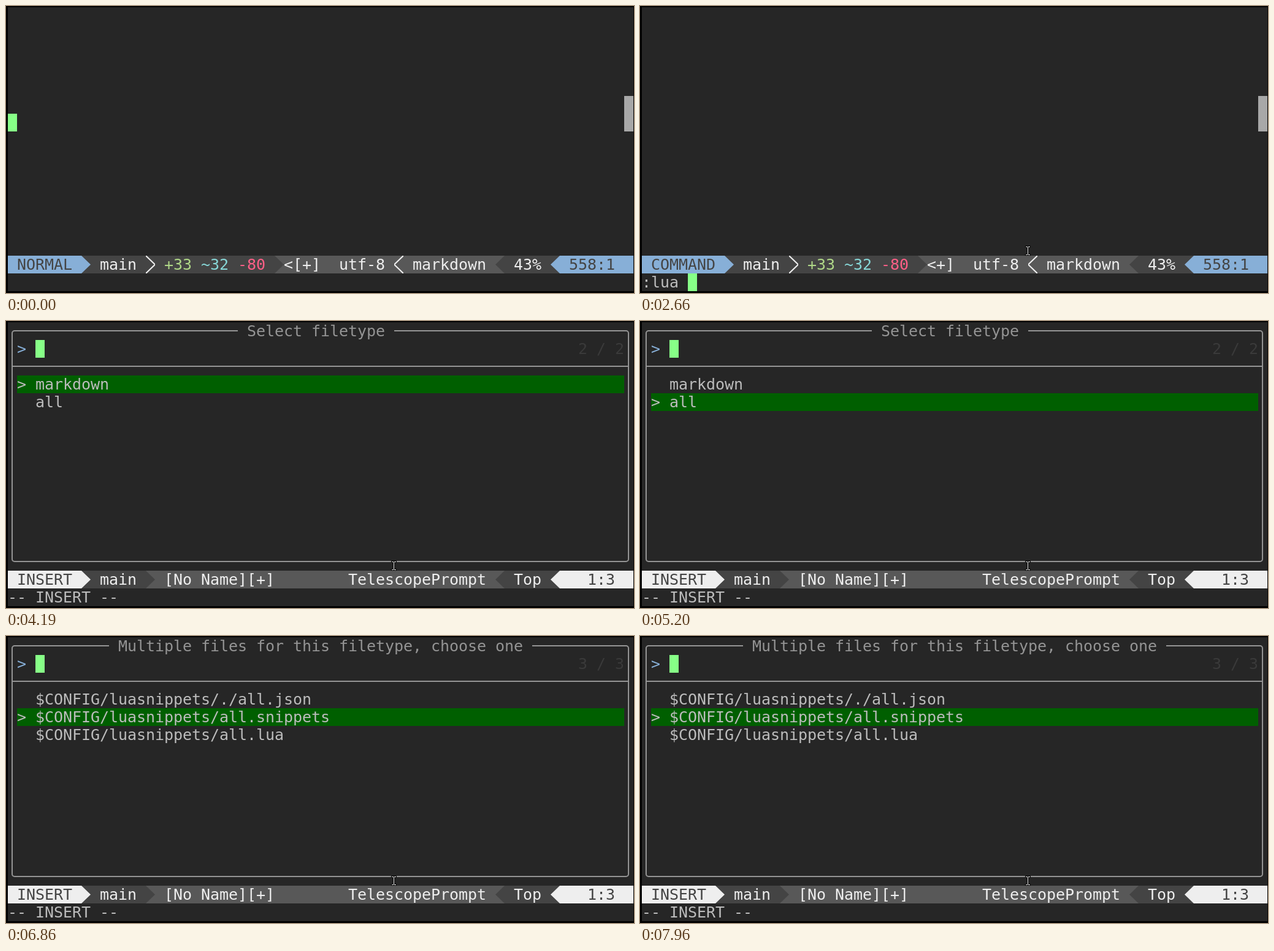
An HTML page with a canvas that plays this animation: 1024x469 px, repeating every 8000 ms.

```html
<!DOCTYPE html>
<html lang="en">
<head>
<meta charset="utf-8">
<title>Editing snippet files</title>
<style>
html, body { margin: 0; width: 100%; height: 100%; overflow: hidden; background: #000; }
canvas { display: block; }
</style>
</head>
<body>
<canvas id="screen" width="1024" height="469"></canvas>
<script>
const ctx = document.getElementById('screen').getContext('2d');
const LOOP = 8000, LEFT = 3, TOP = 2, CW = 15, CH = 29, COLS = 68;
const C = {
  bg: '#262626', fg: '#bcbcbc', white: '#eeeeee', blue: '#87afd7',
  dark: '#444444', mid: '#585858', cursor: '#87ff87', bar: '#a8a8a8',
  border: '#949494', faint: '#3a3a3a', select: '#005f00',
  add: '#afd787', change: '#87d7d7', remove: '#ff5f87'
};
const COMMAND = ':lua require("luasnip.loaders").edit_snippet_files()';
const TYPES = { title: 'Select filetype', items: ['markdown', 'all'] };
const FILES = {
  title: 'Multiple files for this filetype, choose one',
  items: ['./all.json', 'all.snippets', 'all.lua'].map(f => '$CONFIG/luasnippets/' + f)
};

const x = col => LEFT + col * CW;
const y = row => TOP + row * CH;

// Value of the last [time, value] step reached at t.
function at(steps, t) {
  let value = steps[0][1];
  for (const [start, v] of steps) if (t >= start) value = v;
  return value;
}

function cells(col, row, w, h, color) {
  ctx.fillStyle = color;
  ctx.fillRect(x(col), y(row), w * CW, h * CH);
}

function text(str, col, row, color) {
  ctx.fillStyle = color;
  [...str].forEach((ch, i) => {
    if (ch !== ' ') ctx.fillText(ch, x(col + i), y(row) + 23);
  });
}

// Powerline chevron in the status row; dir is 1 for right, -1 for left.
function chevron(col, dir) {
  const base = x(dir > 0 ? col : col + 1), top = y(14);
  ctx.beginPath();
  ctx.moveTo(base, top);
  ctx.lineTo(base + dir * CW, top + CH / 2);
  ctx.lineTo(base, top + CH);
}

function wedge(col, dir, color) {
  chevron(col, dir);
  ctx.fillStyle = color;
  ctx.fill();
}

function thin(col, dir) {
  ctx.save();
  ctx.beginPath();
  ctx.rect(x(col), y(14), CW, CH);
  ctx.clip();
  chevron(col, dir);
  ctx.strokeStyle = C.white;
  ctx.lineWidth = 2;
  ctx.stroke();
  ctx.restore();
}

function status(mode, accent, midCol, type, percent, place) {
  const end = mode.length + 2;
  cells(0, 14, COLS, 1, C.mid);
  cells(0, 14, midCol, 1, C.dark);
  wedge(midCol, 1, C.dark);
  cells(0, 14, end, 1, accent);
  wedge(end, 1, accent);
  text(mode, 1, 14, C.dark);
  text('main', end + 2, 14, C.white);
  text(type, 52 - type.length, 14, C.white);
  wedge(53, -1, C.dark);
  cells(54, 14, 6, 1, C.dark);
  text(percent, 55, 14, C.white);
  wedge(59, -1, accent);
  cells(60, 14, 8, 1, accent);
  text(place, 66 - place.length, 14, C.dark);
}

function editor(t) {
  const typing = t >= 1540;
  const mode = typing ? 'COMMAND' : 'NORMAL';
  const n = mode.length;
  cells(67, 5, 1, 2, C.bar);
  status(mode, C.blue, n + 23, 'markdown', '43%', '558:1');
  thin(n + 9, 1);
  text('+33', n + 11, 14, C.add);
  text('~32', n + 15, 14, C.change);
  text('-80', n + 19, 14, C.remove);
  text(typing ? '<+]' : '<[+]', n + 24, 14, C.white);
  text('utf-8', 36, 14, C.white);
  thin(42, -1);

  if (!typing) return cells(0, 6, 1, 1, C.cursor);
  const len = at([[1540, 1], [1820, 2], [2170, 3], [2220, 4], [2660, 5], [3360, COMMAND.length]], t);
  text(COMMAND.slice(0, len), 0, 15, C.fg);
  if (t >= 3190 && t < 3360) text('"', len, 15, C.blue);
  else cells(len, 15, 1, 1, C.cursor);
}

function frame(title) {
  const l = x(0) + 7, r = x(67) + 7, top = y(0) + 14, bottom = y(13) + 14;
  const start = Math.floor((COLS - title.length) / 2);
  ctx.strokeStyle = C.border;
  ctx.lineWidth = 2;
  ctx.beginPath();
  ctx.roundRect(l, top, r - l, bottom - top, 4);
  ctx.moveTo(l, y(2) + 14);
  ctx.lineTo(r, y(2) + 14);
  ctx.stroke();
  cells(start - 1, 0, title.length + 2, 1, C.bg);
  text(title, start, 0, C.border);
}

function picker(t) {
  const { title, items } = t < 5660 ? TYPES : FILES;
  const chosen = at([[4100, 0], [5200, 1], [5660, 0], [6860, 1], [7240, 2], [7810, 0], [7960, 1]], t);
  frame(title);
  text('>', 1, 1, C.blue);
  cells(3, 1, 1, 1, C.cursor);
  if (t >= 4190) {
    text(`${items.length} / ${items.length}`, 62, 1, C.faint);
    cells(1, 3 + chosen, 66, 1, C.select);
    text('>', 1, 3 + chosen, C.fg);
    items.forEach((item, i) => text(item, 3, 3 + i, C.fg));
  }
  status('INSERT', C.white, 15, 'TelescopePrompt', 'Top', '1:3');
  text('[No Name][+]', 17, 14, C.white);
  text('-- INSERT --', 0, 15, C.fg);
}

function beam(cx, cy) {
  const parts = [[-3, -7, 3, 1], [1, -7, 3, 1], [0, -6, 1, 12], [-3, 6, 3, 1], [1, 6, 3, 1]];
  ctx.fillStyle = '#000';
  for (const [dx, dy, w, h] of parts) ctx.fillRect(cx + dx - 1, cy + dy - 1, w + 2, h + 2);
  ctx.fillStyle = '#fff';
  for (const [dx, dy, w, h] of parts) ctx.fillRect(cx + dx, cy + dy, w, h);
}

function pointer(t) {
  if (t < 200) return;
  const step = Math.min(4, Math.floor((t - 200) / 77.5));
  const ease = 1 - (1 - step / 4) ** 2;
  const nudge = t < 660 ? 1 : 0;
  beam(Math.round(541 + 91 * ease), Math.round(455 - 55 * ease) + nudge);
}

function draw(now) {
  const t = now % LOOP;
  ctx.fillStyle = '#000';
  ctx.fillRect(0, 0, 1024, 469);
  cells(0, 0, COLS, 16, C.bg);
  ctx.font = '25px "DejaVu Sans Mono", monospace';
  if (t < 4100) editor(t);
  else picker(t);
  pointer(t);
}

const began = performance.now();
function tick() {
  draw(performance.now() - began);
  requestAnimationFrame(tick);
}
tick();
</script>
</body>
</html>
```
